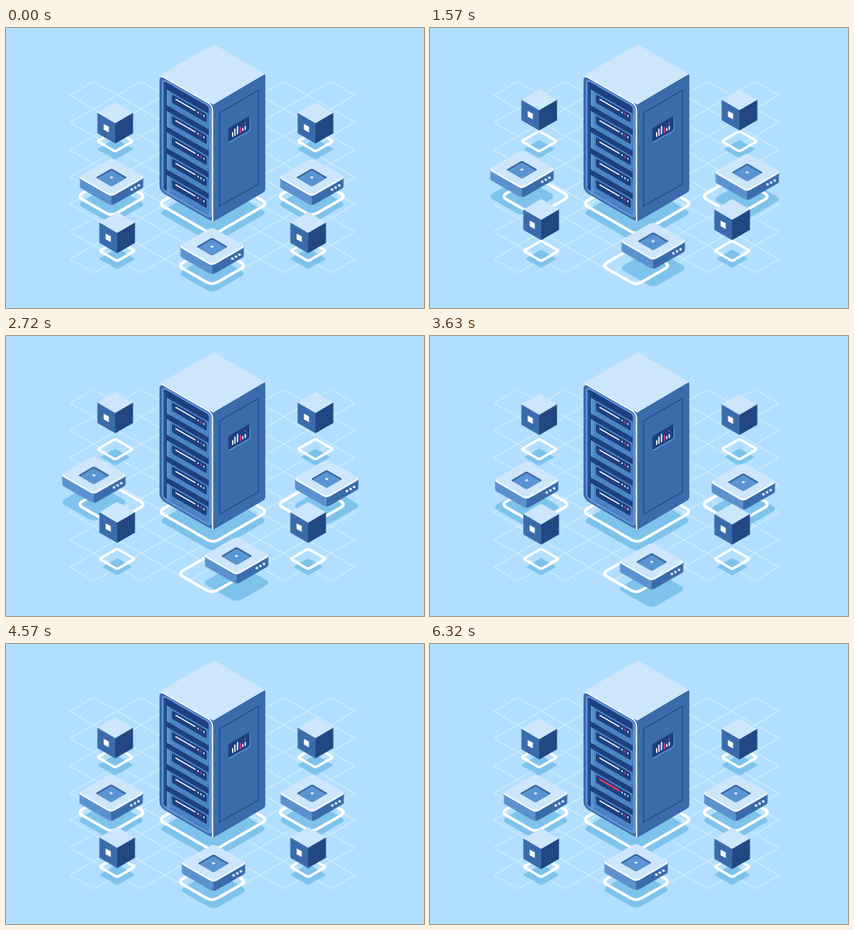
These frames come from a looping animation (640x429 px, 7.17 s). An HTML page:

```html
<!DOCTYPE html>
<html lang="en">
<head>
<meta charset="utf-8">
<title>Server network</title>
<style>
  html, body { margin: 0; width: 100%; height: 100%; overflow: hidden; background: #b2dfff; }
  svg { display: block; width: 100%; height: 100%; }
  .slide, .orbit, .lift, .shrink, .load { animation: 7.17s cubic-bezier(.364, 0, .636, 1) infinite; }
  .slide { animation-name: slide; }
  .orbit { animation-name: orbit; }
  .lift { animation-name: lift; }
  .shrink { animation-name: shrink; }
  .load { animation-name: load; animation-timing-function: linear; stroke-dasharray: 36 60; }

  @keyframes slide {
    0%, 66.946%, 100% { transform: translate(0, 0); }
    33.473% { transform: translate(var(--dx), var(--dy)); }
  }
  @keyframes orbit {
    0%, 66.946%, 100% { transform: translate(0, 0); }
    16.736% { transform: translate(22.2px, -10.7px); }
    33.473% { transform: translate(40.3px, .2px); }
    50.209% { transform: translate(23.8px, 11.2px); }
  }
  @keyframes lift {
    0%, 8.926% { transform: translate(0, 0); animation-timing-function: cubic-bezier(.37, 0, .55, 1); }
    30.404%, 45.607% { transform: translate(0, -28px); animation-timing-function: cubic-bezier(.45, 0, .63, 1); }
    67.085%, 100% { transform: translate(0, 0); }
  }
  @keyframes shrink {
    0%, 8.926% { transform: scale(1); animation-timing-function: cubic-bezier(.37, 0, .55, 1); }
    30.404%, 45.607% { transform: scale(.81); animation-timing-function: cubic-bezier(.45, 0, .63, 1); }
    67.085%, 100% { transform: scale(1); }
  }
  @keyframes load {
    0%, 77.27% { stroke-dashoffset: 38; }
    88.15%, 100% { stroke-dashoffset: 0; }
  }
</style>
</head>
<body>
<svg id="stage" viewBox="0 0 640 429">
  <defs><clipPath id="right"><rect x="0" y="-60" width="80" height="140"/></clipPath></defs>
</svg>
<script>
const SLOPE = .577;
const SHADOW = '#7dc3ec', LIGHT = '#cde6fb', SKY = '#5b92ce', BLUE = '#3a6bab', NAVY = '#1d4080', PINK = '#f0308c';

// Isometric diamond around the origin, corners cut by the fraction r and rounded.
function diamond(w, r) {
  const h = w * SLOPE;
  const corners = [[0, -h], [w, 0], [0, h], [-w, 0]];
  const mix = (a, b, k) => [a[0] + (b[0] - a[0]) * k, a[1] + (b[1] - a[1]) * k].map(n => n.toFixed(2));
  return corners.map((c, i) => {
    const from = mix(c, corners[(i + 3) % 4], r), to = mix(c, corners[(i + 1) % 4], r);
    return `${i ? 'L' : 'M'}${from} Q${c} ${to}`;
  }).join('') + 'Z';
}

const at = (x, y, body) => `<g transform="translate(${x} ${y})">${body}</g>`;
const path = (d, fill, extra = '') => `<path d="${d}" fill="${fill}" ${extra}/>`;
const ring = (d, width) => path(d, 'none', `stroke="#fff" stroke-width="${width}"`);
const rect = (x, y, w, h, rx, fill) =>
  `<rect x="${x}" y="${y}" width="${w}" height="${h}" rx="${rx}" fill="${fill}"/>`;
const dot = (x, y, r, fill = '#fff') => `<circle cx="${x}" cy="${y}" r="${r}" fill="${fill}"/>`;
const line = (d, color, width, extra = '') =>
  path(d, 'none', `stroke="${color}" stroke-width="${width}" stroke-linecap="round" ${extra}`);

function grid() {
  const w = 436 / 6, h = 293 / 7;
  let d = '';
  for (let i = 0; i < 6; i++)
    for (let j = 0; j < 7; j++)
      d += `M${98 + i * w + w / 2} ${82 + j * h}l${w / 2} ${h / 2}l${-w / 2} ${h / 2}l${-w / 2} ${-h / 2}z`;
  return path(d, 'none', 'stroke="#d3edff" stroke-width="1.3"');
}

function cube(x, y) {
  return at(x, y,
    at(0, 39.5, `<g class="shrink">${path(diamond(28, .06), SHADOW)}</g>`) +
    at(0, 27.5, ring(diamond(27, .08), 3.8)) +
    `<g class="lift">
      ${path('M0 -32L27.3 -16L0 0L-27.3 -16Z', LIGHT)}
      ${path('M-27.3 -16L0 0V31L-27.3 15.2Z', BLUE)}
      ${path('M27.3 -16L0 0V31L27.3 15.2Z', '#224782')}
      ${path('M-17.6 1L-9.8 5.2V14L-17.6 9.8Z', '#fff')}
    </g>`);
}

function disc(x, y, motion, style = '') {
  const top = diamond(51.2, .11), base = diamond(52.5, .16), well = diamond(24, .08);
  const side = fill => rect(-48.4, 0, 96.8, 14, 0, fill) + at(0, 14, path(top, fill));
  const move = body => `<g class="${motion}" style="${style}">${body}</g>`;
  return at(x, y,
    move(at(0, 41, path(base, SHADOW))) +
    at(0, 29, ring(base, 4.4)) +
    move(side(SKY) + `<g clip-path="url(#right)">${side(BLUE)}</g>` +
      path(top, '#fff') +
      path(top, LIGHT, 'transform="translate(0 -1.4) scale(.96)"') +
      path(well, '#336199') +
      path(well, '#5a94d2', 'transform="translate(0 1.3) scale(.9)"') +
      path('M0 -1.9L3 -.1L0 1.8L-3 -.1Z', '#e6f3ff') +
      dot(31, 18.5, 2, '#e6f3ff') + dot(36.5, 15.4, 2, '#e6f3ff') + dot(42, 12.2, 2, '#e6f3ff')));
}

function shelf(row) {
  const bar = 'M25.3 23H54.3';
  return at(0, row * 32.7,
    rect(11, 16, 64.5, 24, 0, '#4b83c4') +
    rect(11, 16, 5, 24, 0, SKY) +
    rect(19, 18.5, 53.5, 13, 3, NAVY) +
    line(bar, '#fff', 2) +
    (row === 3 ? line(bar, '#e6324b', 2.8, 'class="load"') : '') +
    dot(59, 23.3, 1.2) + dot(63.5, 23.5, 1.3, row === 3 ? '#fff' : PINK) + dot(68, 23.5, 1.2));
}

function server() {
  const bars = [[347, 160.5, 166], [350.5, 155, 164.5], [354.5, 151, 162], [358.8, 152.5, 160], [362.5, 154, 157], [366.4, 151, 155.5]];
  return at(317, 283, path(diamond(83, .1), SHADOW)) +
    at(317, 269, ring(diamond(83.5, .1), 4.4)) +
    path('M312 115L396 70.5Q397 71 397 73V247Q397 250 394 252L317 297L312 294Z', BLUE) +
    `<g transform="matrix(1 ${SLOPE} 0 1 235 72)">
      ${rect(0, 0, 82, 178, 8, BLUE)}
      ${rect(3.5, 2, 77, 173.5, 8, '#5f93d6')}
      ${rect(6, 5, 69.5, 166, 4, NAVY)}
      ${rect(6, 9, 3, 158, 0, '#2a5799')}
      ${[0, 1, 2, 3, 4].map(shelf).join('')}
    </g>` +
    path('M237 71.5L315 26.5Q318 24.5 321 26.5L396.5 70.5L317 117.5Z', LIGHT) +
    line(`M238 73.5L309 114.3Q316.3 118.5 316.3 127V296`, '#fff', 1.9) +
    path('M327 130L386.5 95.5V239L327 273Z', 'none', `stroke="${NAVY}" stroke-width="1.2"`) +
    path('M342 155L371 138Q374 136 374 139V155Q374 157.5 371.5 159L343.5 175Q341 176 341 173Z', '#6a9fd9') +
    path('M340.5 156Q340.5 153.5 343 152L370 136.2Q373 134.5 373 138V154Q373 156.5 370.5 158L343 173.5Q340.5 175 340.5 172Z', NAVY) +
    bars.map(([x, y1, y2], i) => line(`M${x} ${y1}V${y2}`, i === 3 ? PINK : '#fff', 1.9)).join('') +
    dot(366.4, 145.5, 1.2, PINK);
}

document.getElementById('stage').insertAdjacentHTML('beforeend',
  grid() + server() +
  cube(167.2, 146) + cube(473.8, 146) +
  disc(161.5, 229, 'slide', '--dx:-28.3px;--dy:-16.3px') +
  disc(468.2, 229, 'slide', '--dx:23.8px;--dy:-10.5px') +
  disc(315.5, 335, 'orbit') +
  cube(170.2, 314) + cube(462.6, 314));
</script>
</body>
</html>
```
